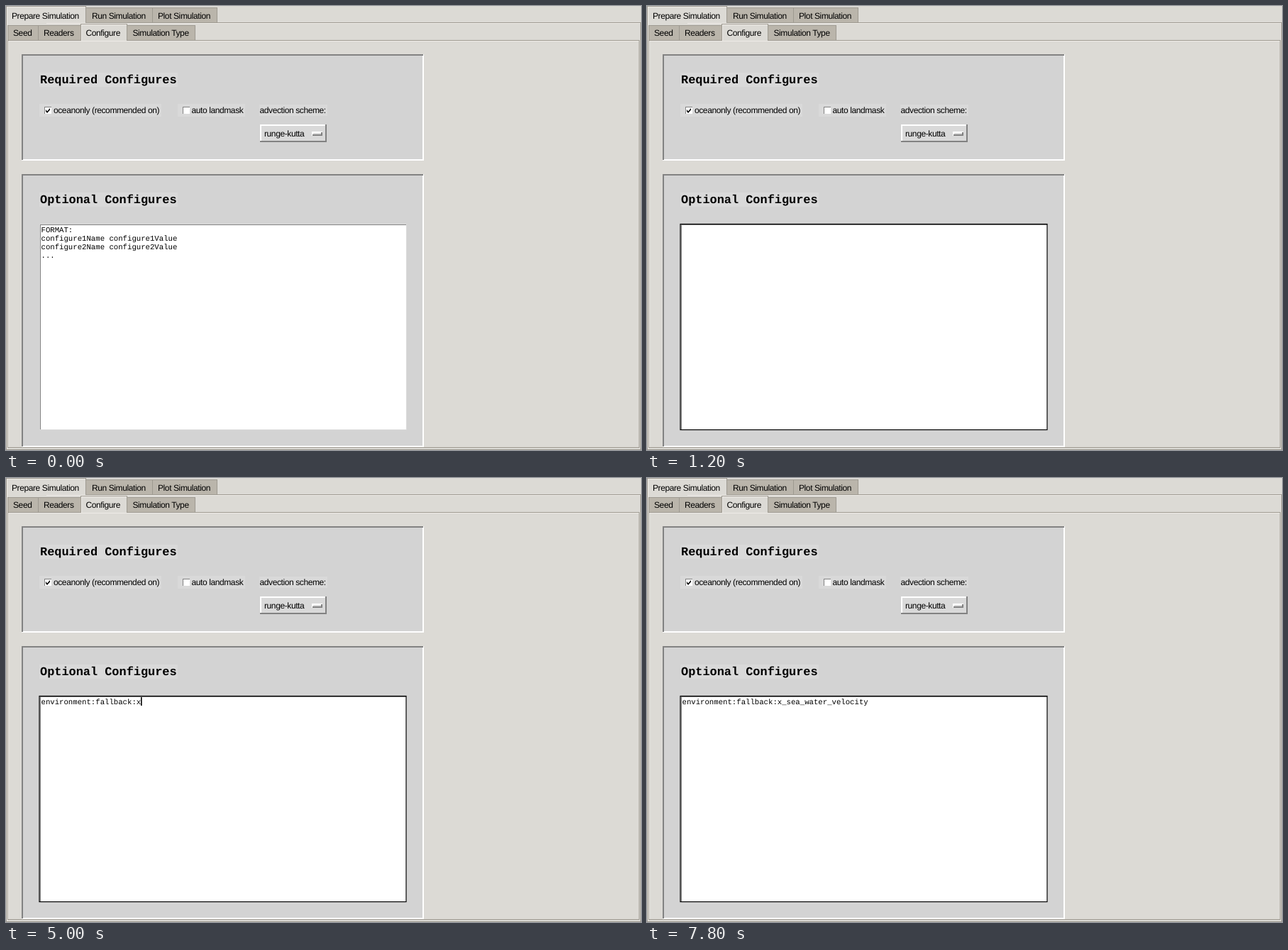
Write an HTML page that moves like this. It is 895 px wide and 626 px high and loops after 8000 ms.

```html
<!DOCTYPE html>
<html lang="en">
<head>
<meta charset="utf-8">
<title>Configure form</title>
<style>
  html, body { margin: 0; width: 100%; height: 100%; overflow: hidden; background: #dcdad5; }
  svg { display: block; width: 895px; height: 626px; }
  rect, path { shape-rendering: crispEdges; }
  text { font: 12px "Liberation Sans", Arial, sans-serif; letter-spacing: -.4px; text-rendering: geometricPrecision; white-space: pre; }
  .head { font: bold 16.9px "Liberation Mono", "Courier New", monospace; letter-spacing: 0; }
  .mono text { font: 10.66px "Liberation Mono", "Courier New", monospace; letter-spacing: 0; }
  .line { fill: none; stroke: #9e9a91; }
  .shine { fill: none; stroke: #eeebe7; }
  .tab { fill: #bab5ab; stroke: #9e9a91; }
  .open { fill: #dcdad5; }
  .panel { fill: #d3d3d3; }
  .label { fill: #d9d9d9; }
  .dark { fill: none; stroke: #828282; }
  .light { fill: none; stroke: #fff; }
  .thick { stroke-width: 2; }
  .sel { fill: #c3c3c3; }
</style>
</head>
<body>
<svg viewBox="0 0 895 626">
  <rect class="open" width="895" height="626"/>

  <!-- outer tabs -->
  <rect class="line" x=".5" y="23.5" width="894" height="602"/>
  <path class="shine" d="M1.5 625V24.5H894"/>
  <rect class="tab" x="112.5" y="2.5" width="94" height="21"/>
  <rect class="tab" x="206.5" y="2.5" width="91" height="21"/>
  <path class="tab open" d="M.5 25V.5H112.5V24"/>
  <path class="shine" d="M1.5 25V1.5H112"/>
  <text x="8" y="17.5">Prepare Simulation</text>
  <text x="121" y="17.5">Run Simulation</text>
  <text x="214" y="17.5">Plot Simulation</text>

  <!-- inner tabs -->
  <rect class="line" x="2.5" y="48.5" width="890" height="574"/>
  <path class="shine" d="M3.5 622V49.5H892"/>
  <rect class="tab" x="2.5" y="27.5" width="43" height="21"/>
  <rect class="tab" x="45.5" y="27.5" width="60" height="21"/>
  <rect class="tab" x="170.5" y="27.5" width="96" height="21"/>
  <path class="tab open" d="M105.5 49V25.5H170.5V49"/>
  <path class="shine" d="M106.5 49V26.5H170"/>
  <text x="10" y="42">Seed</text>
  <text x="53" y="42">Readers</text>
  <text x="112.5" y="42">Configure</text>
  <text x="178.5" y="42">Simulation Type</text>

  <!-- required panel -->
  <rect class="panel" x="22" y="68" width="567" height="150"/>
  <path class="light thick" d="M22 217H588V68"/>
  <path class="dark thick" d="M23 217V69H588"/>
  <rect class="label" x="47" y="94" width="195" height="20"/>
  <text class="head" x="48" y="109">Required Configures</text>

  <rect class="label" x="47" y="138" width="172" height="18"/>
  <rect class="label" x="242" y="138" width="95" height="18"/>
  <rect class="label" x="357" y="139" width="96" height="16"/>
  <g id="box">
    <rect x="54" y="142" width="10" height="10" fill="#fff"/>
    <path class="dark" d="M54.5 152V142.5H64"/>
  </g>
  <use href="#box" x="195"/>
  <path d="M56 146L58 148.5L62 144V146.5L58 151L56 148.5Z" style="shape-rendering:auto"/>
  <text x="67" y="151">oceanonly (recommended on)</text>
  <text x="261.5" y="151">auto landmask</text>
  <text x="357.5" y="151">advection scheme:</text>

  <rect class="label" x="358" y="167" width="94" height="25"/>
  <path class="light thick" d="M359 192V168H452"/>
  <path class="dark thick" d="M358 191H451V167"/>
  <text x="364" y="184">runge-kutta</text>
  <path class="light thick" d="M432 183V178H446"/>
  <path class="dark thick" d="M432 182H445V178"/>

  <!-- optional panel -->
  <rect class="panel" x="22" y="237" width="567" height="385"/>
  <path class="light thick" d="M22 621H588V237"/>
  <path class="dark thick" d="M23 621V238H588"/>
  <rect class="label" x="47" y="263" width="195" height="20"/>
  <text class="head" x="48" y="278">Optional Configures</text>

  <!-- text area -->
  <rect class="label" x="47" y="307" width="518" height="291"/>
  <rect x="48" y="308" width="516" height="289" fill="#fff"/>
  <path class="dark" d="M48.5 597V308.5H564"/>
  <rect id="focus" x="47" y="307.5" width="517" height="290" fill="none" stroke="#000" stroke-width="1.2" style="shape-rendering:auto"/>
  <g class="mono">
    <g id="selection">
      <rect class="sel" id="firstRow" x="49" y="309" width="513" height="12"/>
      <rect class="sel" x="49" y="321" width="513" height="24"/>
      <rect class="sel" x="49" y="345" width="20" height="12"/>
    </g>
    <g id="hint">
      <text x="49.5" y="319">FORMAT:</text>
      <text x="49.5" y="331">configure1Name configure1Value</text>
      <text x="49.5" y="343">configure2Name configure2Value</text>
      <text x="49.5" y="355">...</text>
    </g>
    <text id="typed" x="49.5" y="319"></text>
    <rect id="caret" width="1.6" height="12" style="shape-rendering:auto"/>
  </g>
</svg>
<script>
const LOOP = 8000, STEP = 100, FOCUS = 800, SELECT_ALL = 900, CLEAR = 1200;
const LEFT = 49.5, TOP = 309, ROW = 12, ADVANCE = 6.4;

// Start time of each burst, then one piece of text per step.
const bursts = [
  [1700, "e|n|v|i|r|o|n||m|en|t"],
  [3100, ":||f|a|l|l"],
  [3800, "ba|c"],
  [4100, "k"],
  [4500, ":"],
  [4900, "x"],
  [5200, "_|s|e|a"],
  [5900, "_"],
  [6300, "w|a"],
  [6600, "t|e|r"],
  [7000, "_|v|e|l|o|ci"],
  [7700, "t|y"]
];
const keys = bursts.flatMap(([start, text]) =>
  text.split("|").map((piece, i) => [start + i * STEP, piece]));

const $ = id => document.getElementById(id);
const show = (id, on) => { $(id).style.display = on ? "" : "none"; };

function caretOn(t) {
  if (t < FOCUS) return false;
  if (t < 1700) return t < 1100 || t >= 1300;
  return t % 600 >= 200;
}

function draw(t) {
  const text = keys.filter(k => k[0] <= t).map(k => k[1]).join("");
  const row = t >= FOCUS && t < SELECT_ALL ? 1 : 0;
  show("focus", t >= FOCUS);
  show("selection", t >= FOCUS && t < CLEAR);
  show("firstRow", t >= SELECT_ALL);
  show("hint", t < CLEAR);
  show("caret", caretOn(t));
  $("typed").textContent = text;
  $("caret").setAttribute("x", LEFT - .3 + text.length * ADVANCE);
  $("caret").setAttribute("y", TOP + row * ROW);
}

function tick() {
  draw(performance.now() % LOOP);
  requestAnimationFrame(tick);
}
tick();
</script>
</body>
</html>
```
